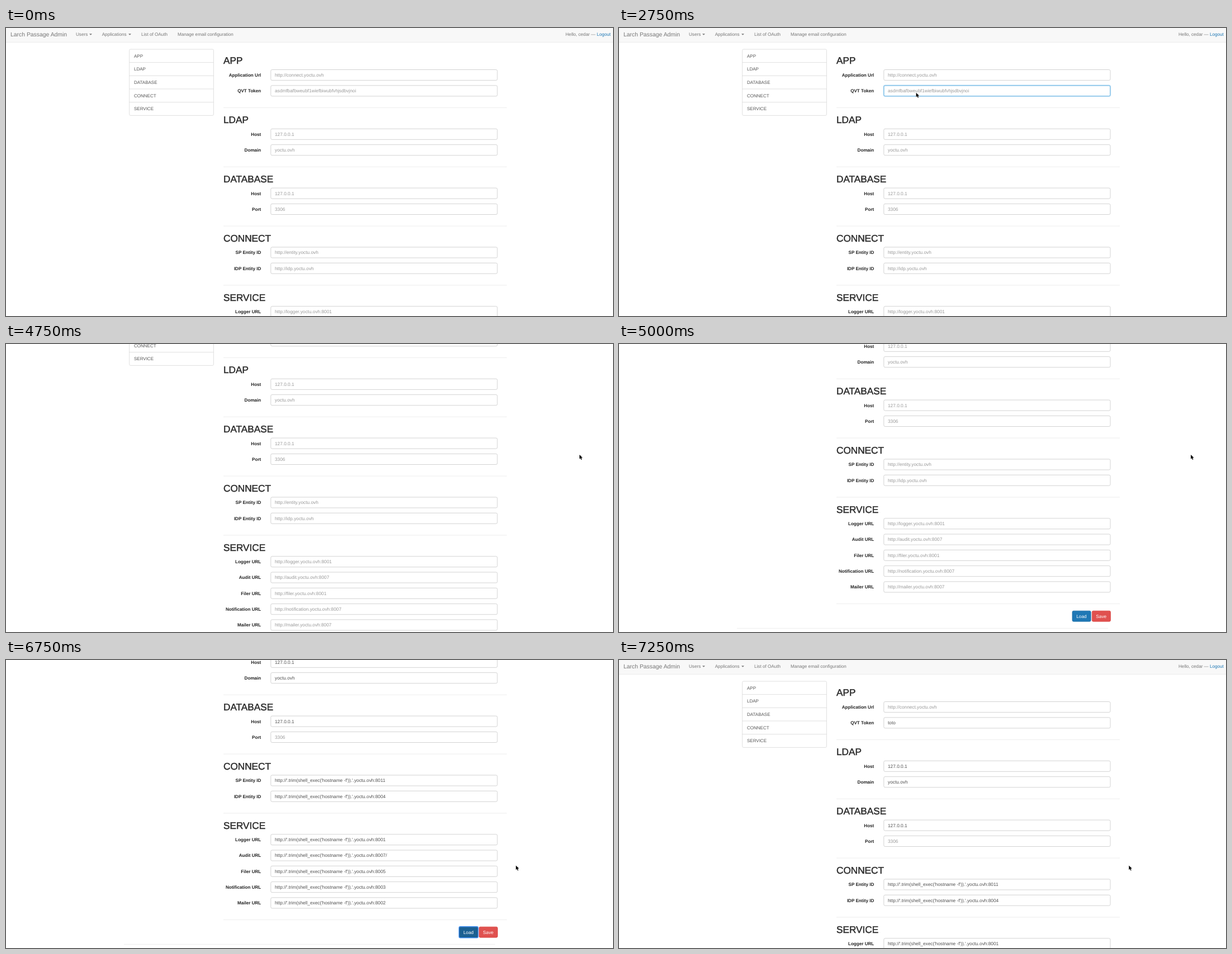
Write an HTML page that moves like this. It is 1086 px wide and 515 px high and loops after 8000 ms.

```html
<!DOCTYPE html>
<html lang="en">
<head>
<meta charset="utf-8">
<title>Admin settings form</title>
<style>
  html, body { margin: 0; width: 100%; height: 100%; overflow: hidden; background: #fff; }
  svg { display: block; font: 8.3px "Liberation Sans", Arial, sans-serif; text-rendering: geometricPrecision; }
  text { white-space: pre; }
  .brand { font-size: 10.4px; fill: #777; }
  .nav { font-size: 8.15px; fill: #777; }
  .link { fill: #1f78b5; }
  .item { font-size: 8px; fill: #555; }
  .heading { font-size: 17.2px; fill: #2d2d2d; stroke: #2d2d2d; stroke-width: .5; }
  .label { font-size: 8.1px; font-weight: bold; fill: #222; text-anchor: end; }
  .placeholder { fill: #999; }
  .value { fill: #505050; }
  .button { fill: #fff; text-anchor: middle; }
  .line { stroke: #e9e9e9; stroke-width: .8; }
  .box { fill: #fff; stroke: #c8c8c8; stroke-width: .8; }
  .panel { fill: none; stroke: #d8d8d8; stroke-width: .8; }
</style>
</head>
<body>
<svg id="stage" width="1086" height="515" viewBox="0 0 1086 515"></svg>
<script>
const LOOP = 8000, ROW = 28.3, SECTION = 105.8;
const stage = document.getElementById('stage');

function add(parent, tag, attrs, content = '') {
  const node = document.createElementNS('http://www.w3.org/2000/svg', tag);
  for (const key in attrs) node.setAttribute(key, attrs[key]);
  node.textContent = content;
  return parent.appendChild(node);
}
const page = add(stage, 'g', {});
const text = (x, y, style, content) => add(page, 'text', { x, y, class: style }, content);
const line = (x1, x2, y, style = 'line') => add(page, 'line', { x1, x2, y1: y, y2: y, class: style });
const rect = (x, y, width, height, attrs) => add(page, 'rect', { x, y, width, height, rx: 2.3, ...attrs });
const inputBox = (centerY, attrs) => rect(473.8, centerY - 9.5, 405.2, 19.1, attrs);
const show = (node, visible) => node.setAttribute('visibility', visible ? 'visible' : 'hidden');

const host = port => `http://'.trim(shell_exec('hostname -f')).'.yoctu.ovh:${port}`;
// Each field: label, placeholder, value after loading
const sections = {
  APP: [['Application Url', 'http://connect.yoctu.ovh'],
        ['QVT Token', 'asdmfbafbweubf1wiefbiwubfvhjsdbvjnoi']],
  LDAP: [['Host', '127.0.0.1', '127.0.0.1'], ['Domain', 'yoctu.ovh', 'yoctu.ovh']],
  DATABASE: [['Host', '127.0.0.1', '127.0.0.1'], ['Port', '3306']],
  CONNECT: [['SP Entity ID', 'http://entity.yoctu.ovh', host(8011)],
            ['IDP Entity ID', 'http://idp.yoctu.ovh', host(8004)]],
  SERVICE: [['Logger URL', 'http://logger.yoctu.ovh:8001', host(8001)],
            ['Audit URL', 'http://audit.yoctu.ovh:8007', host('8007/')],
            ['Filer URL', 'http://filer.yoctu.ovh:8001', host(8005)],
            ['Notification URL', 'http://notification.yoctu.ovh:8007', host(8003)],
            ['Mailer URL', 'http://mailer.yoctu.ovh:8007', host(8002)]]
};

// Navigation bar
rect(0, 0, 1086, 25.4, { rx: 0, fill: '#f8f8f8' });
line(0, 1086, 25.5);
text(8, 14.6, 'brand', 'Larch Passage Admin');
[[125, 'Users', 149], [171.7, 'Applications', 219], [242, 'List of OAuth'], [307, 'Manage email configuration']]
  .forEach(([x, label, caretX]) => {
    text(x, 14, 'nav', label);
    if (caretX) add(page, 'path', { d: `M${caretX} 10.2h5l-2.5 2.6z`, fill: '#777' });
  });
text(1001, 14, 'nav', 'Hello, cedar —');
text(1057, 14, 'nav link', 'Logout');

// Side menu
rect(220.6, 38, 150.9, 118.4, { class: 'panel' });
Object.keys(sections).forEach((name, i) => {
  const y = 38 + 23.68 * i;
  if (i) line(220.6, 371.5, y, 'panel');
  text(229, y + 14.6, 'item', name);
});

// Form
const fields = [];
Object.entries(sections).forEach(([name, rows], i) => {
  const top = SECTION * i;
  text(389, top + 64.4, 'heading', name);
  rows.forEach(([label, placeholder, loaded = ''], j) => {
    const y = top + 84 + ROW * j;
    text(456.3, y + 2.9, 'label', label);
    inputBox(y, { class: 'box' });
    fields.push({ placeholder, loaded, content: text(481, y + 2.9, 'placeholder', placeholder) });
  });
  line(389, 896, top + 84 + ROW * (rows.length - 1) + 30.2);
});
const token = fields[1];

const glow = inputBox(84 + ROW, { fill: 'none', stroke: '#7cc4f2', 'stroke-width': 2.4, opacity: .35 });
const ring = inputBox(84 + ROW, { fill: 'none', stroke: '#66b9ec', 'stroke-width': .8 });
const caret = rect(0, 107.3, .8, 9.4, { rx: 0, fill: '#333' });

// Buttons and footer
const load = rect(811, 663.2, 33.2, 19, { 'stroke-width': .7 });
const outline = rect(810.5, 662.7, 34.2, 20, { fill: 'none', stroke: '#3c8df0', 'stroke-width': 1.4 });
text(827.4, 676, 'button', 'Load');
rect(846.3, 663.2, 33.2, 19, { fill: '#e0514f', stroke: '#d9403c', 'stroke-width': .7 });
text(862.8, 676, 'button', 'Save');
line(211, 875, 694.4);

const pointer = add(stage, 'path', {
  d: 'M0 0V7.8L1.8 6.1L3 9L4.4 8.4L3.2 5.6H5.6Z',
  fill: '#000', stroke: '#fff', 'stroke-width': .8, 'paint-order': 'stroke'
});

// Stepped timelines: time, then the state that holds from there
const pointerSteps = [
  [500, 575.3, 82.7], [1000, 552.5, 87], [1250, 530.5, 96], [1500, 516.5, 115.3],
  [2000, 531.6, 115.7], [4000, 534.6, 115.7], [4250, 1029, 205.3], [4500, 1032, 203],
  [4750, 1026, 198], [5000, 1023, 198], [5250, 860.6, 482], [5500, 827.6, 504],
  [5750, 827.6, 493], [6500, 890, 386.8], [6750, 912.3, 367.5]
];
const scrollSteps = [[0, 0], [4750, 118], [5000, 186], [7000, 118], [7250, 0]];
const typingSteps = [[0, ''], [3250, 'to'], [3500, 'toto']];
const caretSteps = [[0, 0], [2250, 481], [2750, 0], [3250, 488], [3500, 495.1], [4000, 0]];
const stepAt = (steps, t) => steps.filter(step => step[0] <= t).pop();

function draw(t) {
  page.setAttribute('transform', `translate(0 ${-stepAt(scrollSteps, t)[1]})`);

  for (const field of fields) {
    const value = field === token ? stepAt(typingSteps, t)[1] : t >= 6250 ? field.loaded : '';
    field.content.textContent = value || field.placeholder;
    field.content.setAttribute('class', value ? 'value' : 'placeholder');
  }

  const focused = t >= 2250 && t < 4500;
  show(glow, focused);
  show(ring, focused);
  const caretX = stepAt(caretSteps, t)[1];
  show(caret, caretX > 0);
  caret.setAttribute('x', caretX);

  load.setAttribute('fill', t >= 5750 ? '#1b6092' : '#1f78b5');
  load.setAttribute('stroke', t >= 5750 ? '#164d78' : '#1b6ba3');
  show(outline, t >= 6000);

  const position = stepAt(pointerSteps, t);
  show(pointer, position);
  if (position) pointer.setAttribute('transform', `translate(${position[1]} ${position[2]})`);
  pointer.setAttribute('opacity', t < 750 ? .5 : 1);
}

const start = performance.now();
(function tick() {
  draw((performance.now() - start) % LOOP);
  requestAnimationFrame(tick);
})();
</script>
</body>
</html>
```
